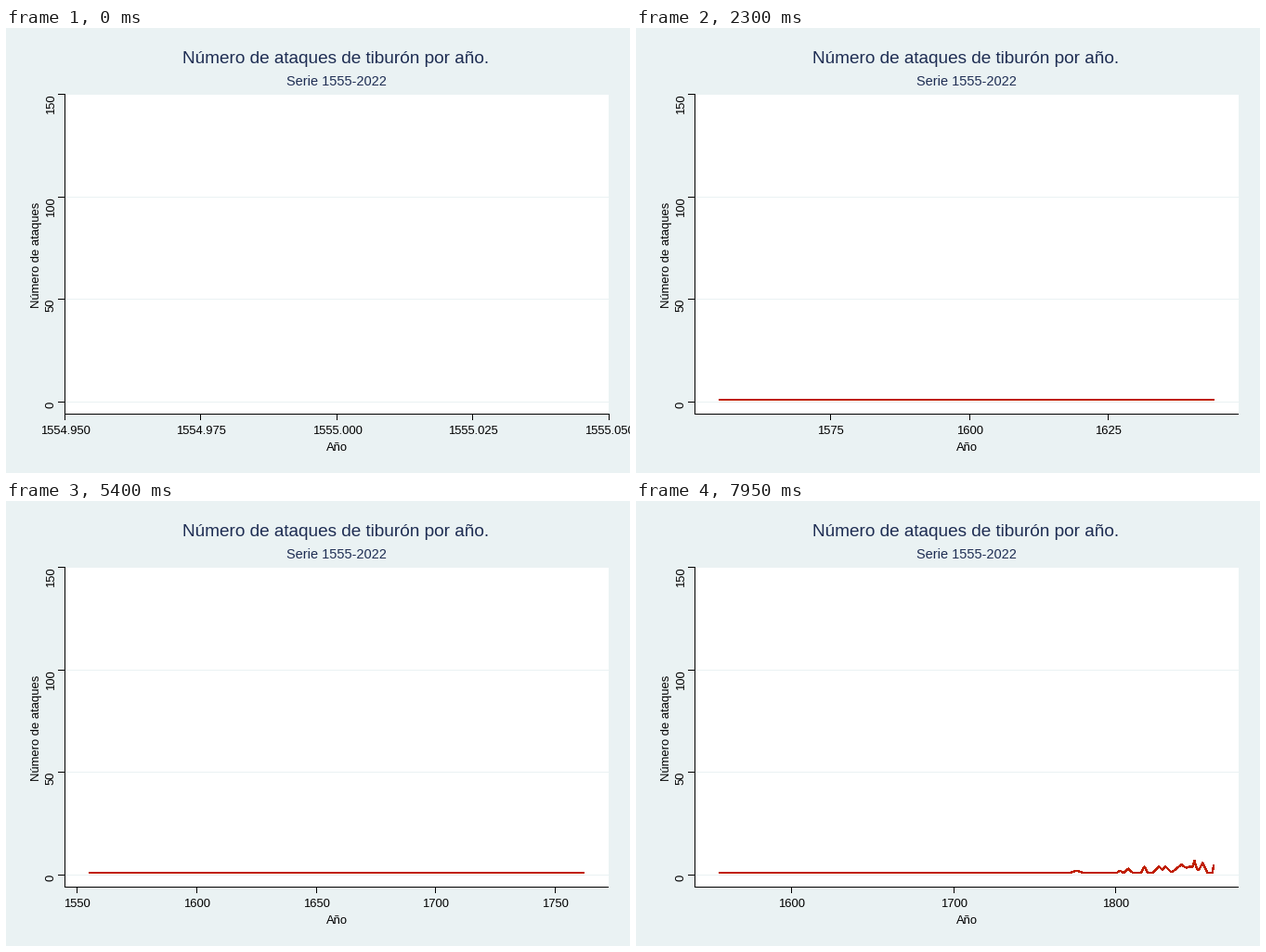
These frames come from a looping animation (672x480 px, 8 s). A matplotlib script:

```python
import math
import numpy as np
import matplotlib.pyplot as plt
from matplotlib.animation import FuncAnimation
from matplotlib.patches import Rectangle

W, H, DPI = 672, 480, 96
FRAMES, INTERVAL = 160, 50
LEFT, RIGHT, TOP, BOTTOM = 63, 649, 71, 416
BG, NAVY, RED = "#EAF2F3", "#1E2D53", "#C01F00"

# The year advances linearly between these, each reached on a whole frame
START, END, STEPS = 1555, 2022, 243
KNOTS = np.array([START, 1595, 1642, 1700, 1721, 1758, 1764, 1791, 1798, 1861])
KNOT_FRAMES = np.round((KNOTS - START) * STEPS / (END - START))

# Triangular peaks above a floor of one attack: year, height, half width
PEAKS = [(1776, 2, 4), (1803, 2, 2), (1808, 3, 2.5), (1818, 4, 2),
         (1827, 4, 4), (1831, 4, 4), (1841, 5, 6.5), (1846, 4, 10),
         (1849, 7, 2), (1854, 6, 3), (1861, 5, 1)]

plt.rcParams["font.family"] = "Liberation Sans"
fig = plt.figure(figsize=(W / DPI, H / DPI), dpi=DPI, facecolor=BG)
ax = fig.add_axes([0, 0, 1, 1])
ax.set_xlim(0, W)
ax.set_ylim(H, 0)
ax.axis("off")


def pt(px):
    return px * 72 / DPI


def box(x, y, w, h, color, z=1):
    return ax.add_patch(Rectangle((x, y), w, h, facecolor=color, linewidth=0,
                                  antialiased=False, zorder=z))


def label(x, y, text, size=13, color="black", ha="center", angle=0):
    return ax.text(x, y, text, fontsize=pt(size), color=color, ha=ha,
                   va="baseline", rotation=angle, rotation_mode="anchor")


def attacks(years):
    count = np.ones_like(years)
    for center, height, half in PEAKS:
        slope = (height - 1) / half
        count = np.maximum(count, height - slope * abs(years - center))
    return count


def y_px(count):
    return 403.6 - 2.2133 * count


def nice_breaks(lo, hi, want=5):
    """Extended Wilkinson labelling, limited to the visible range."""
    span = hi - lo
    best, found = -9, (lo, span, 2)
    base = math.floor(math.log10(span))
    for rank, q in enumerate((1, 5, 2, 2.5, 4, 3)):
        for k in range(2, 12):
            for power in range(base - 2, base + 1):
                step = q * 10.0 ** power
                first = math.floor(hi / step) - (k - 1)
                for n in range(first, math.ceil(lo / step) + 1):
                    a, b = n * step, (n + k - 1) * step
                    cover = 1 - 0.5 * ((hi - b) ** 2 + (lo - a) ** 2) / (0.1 * span) ** 2
                    r = 1 / step
                    rt = (want - 1) / (max(b, hi) - min(a, lo))
                    density = 2 - max(r / rt, rt / r)
                    score = -0.05 * rank + 0.2 * cover + 0.5 * density
                    if score > best + 1e-9:
                        best, found = score, (a, step, k)
    a, step, k = found
    ticks = [round(a + i * step, 6) for i in range(k)]
    return [t for t in ticks if lo - 1e-6 <= t <= hi + 1e-6]


def tick_texts(ticks):
    digits = 0
    while any(abs(t - round(t, digits)) > 1e-6 for t in ticks):
        digits += 1
    return [f"{t:.{digits}f}" for t in ticks]


# Fixed parts
box(LEFT, TOP, RIGHT - LEFT, BOTTOM - TOP, "white")
for value in range(0, 151, 50):
    row = math.floor(y_px(value))
    box(LEFT, row, RIGHT - LEFT, 1, BG, 2)
    box(56, row, 7, 1, "black", 4)
    label(52, row, str(value), ha="right", angle=90)
box(LEFT, TOP, 1, BOTTOM - TOP + 1, "black", 4)
box(LEFT, BOTTOM, RIGHT - LEFT, 1, "black", 4)
label(355.5, 38, "Número de ataques de tiburón por año.", 19, NAVY)
label(356, 62, "Serie 1555-2022", 14.5, NAVY)
label(356, 456, "Año")
label(36, 244.5, "Número de ataques", angle=90)

# Moving parts; the unsmoothed stroke fills every pixel it touches
line, = ax.plot([], [], color=RED, lw=pt(1.2), antialiased=False, snap=False,
                solid_capstyle="butt", solid_joinstyle="round", zorder=3)
marks = [(box(0, BOTTOM, 1, 7, "black", 4), label(0, 438, "")) for _ in range(12)]


def draw(i):
    year = np.interp(i, KNOT_FRAMES, KNOTS)
    pad = 0.05 * (year - START) if i else 0.05
    lo, hi = START - pad, year + pad

    def x_px(x):
        return LEFT + (x - lo) / (hi - lo) * (RIGHT - LEFT)

    xs = np.append(np.arange(START, year), year)
    line.set_data(x_px(xs), y_px(attacks(xs)) - 0.4)
    line.set_visible(i > 0)

    ticks = nice_breaks(lo, hi)
    texts = tick_texts(ticks)
    for n, (mark, text) in enumerate(marks):
        shown = n < len(ticks)
        mark.set_visible(shown)
        text.set_visible(shown)
        if shown:
            col = math.floor(x_px(ticks[n]) + 1e-6)
            mark.set_x(col)
            text.set_x(col + 0.5)
            text.set_text(texts[n])
    return [line]


anim = FuncAnimation(fig, draw, frames=FRAMES, interval=INTERVAL,
                     repeat=True, repeat_delay=0, blit=False)
plt.show()
```
